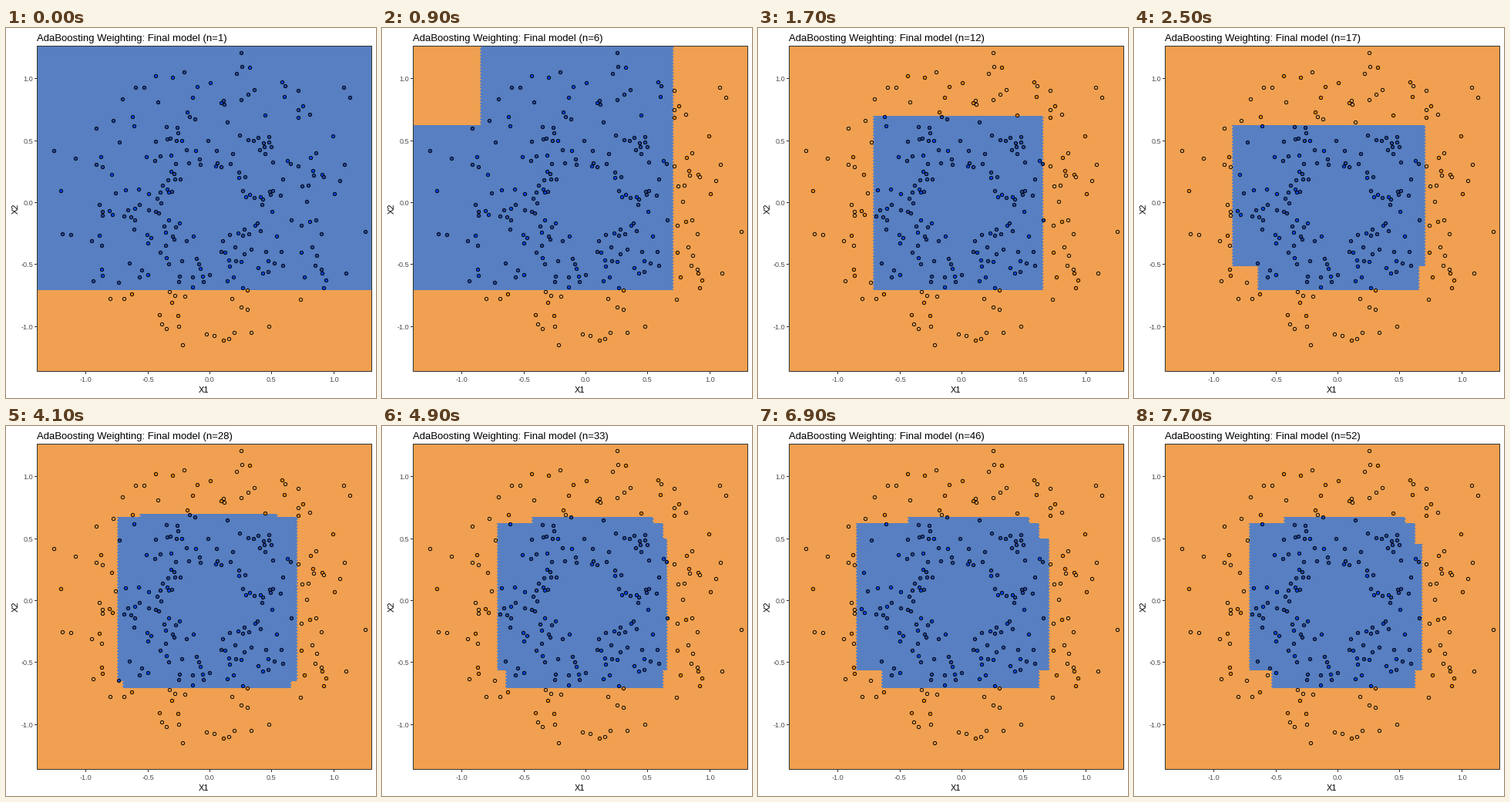
Recreate the animation shown at these times as a matplotlib script. Size 480 by 480 pixels, loop 8 s.

```python
import numpy as np
import matplotlib.pyplot as plt
from matplotlib.animation import FuncAnimation
from matplotlib.patches import Rectangle

SIZE, DPI = 480, 80
PT = 72 / DPI
LEFT, TOP, RIGHT, BOTTOM = 40, 23, 475, 446
X_ZERO, Y_ZERO, UNIT = 264, 227, 160.8
FLOOR, ROW_HEIGHT, FAR = 340, 4.14, 600
BLUE, ORANGE, BRIGHT_BLUE, BRIGHT_ORANGE, DARK_BLUE = np.array([
    (87, 127, 193), (240, 160, 80), (0, 72, 255), (255, 133, 0),
    (35, 72, 170)]) / 255


def ensemble(left=151, right=371, notch=162, waist=366, ledge=126,
             crown=196, top=118, shoulder=146, foot=317):
    """Boxes (x0, y0, x1, y1) whose union is predicted as blue."""
    return [(left, ledge, waist, foot), (crown, top, 353, FLOOR),
            (left, shoulder, right, foot), (notch, ledge, waist, FLOOR)]


half_plane = [(-FAR, -FAR, FAR, FLOOR)]
right_cut = [(-FAR, -FAR, 379, FLOOR)]
corner_cut = [(129, -FAR, 379, FLOOR), (-FAR, 126, 379, FLOOR)]
band = [(-FAR, 114, FAR, FLOOR)]
square = [(151, 114, 371, FLOOR)]
wide = dict(left=129, right=379)
high = dict(right=379, waist=371, ledge=118, shoulder=118, top=114, foot=331)

STEPS = [
    half_plane, right_cut, corner_cut, band, square,
    ensemble(top=126, shoulder=126, foot=309),
    ensemble(**wide, waist=371, top=126, shoulder=126, foot=309),
    ensemble(**wide), square, ensemble(**high),
    ensemble(**high, left=146, notch=153, crown=175),
    ensemble(right=379), ensemble(), ensemble(**wide), ensemble(),
    ensemble(notch=180), ensemble(), ensemble(**wide),
    ensemble(right=379, notch=171, shoulder=153),
    ensemble(right=375, notch=180, shoulder=153),
]


def scatter_ring(count):
    """A ring of points around an empty middle, thinner toward its rim."""
    rng = np.random.default_rng(11)
    outer = [(305, 32), (438, 77), (446, 90), (62, 159), (71, 211),
             (73, 267), (466, 264), (441, 318), (229, 411), (282, 405)]
    points = list(outer)
    while len(points) < count:
        radius, angle = rng.uniform(45, 186), rng.uniform(0, 2 * np.pi)
        x, y = X_ZERO + radius * np.cos(angle), Y_ZERO - radius * np.sin(angle)
        if min(np.hypot(x - a, y - b) for a, b in points) > 4:
            points.append((round(x), round(y)))
    return np.array(points), rng.random((count, 1)) < 0.28


points, is_accent = scatter_ring(258)
xs, ys = np.meshgrid(np.arange(LEFT, RIGHT), np.arange(TOP, BOTTOM))
bulge = 2 * np.abs(np.sin(np.pi * (ys + 0.5 - FLOOR) / ROW_HEIGHT))


def region_image(boxes):
    cover = np.zeros(xs.shape)
    for x0, y0, x1, y1 in boxes:
        side = np.minimum(xs + 1 - x0 + bulge, x1 - xs - bulge)
        cover = np.maximum(cover, np.clip(side, 0, 1) * (ys >= y0) * (ys < y1))
    return ORANGE + cover[..., None] * (BLUE - ORANGE)


def point_colors(boxes):
    x, y = points.T[..., None]
    blue = np.any([(x >= x0) & (x < x1) & (y >= y0) & (y < y1)
                   for x0, y0, x1, y1 in boxes], axis=0)
    return np.where(blue, np.where(is_accent, BRIGHT_BLUE, DARK_BLUE),
                    np.where(is_accent, BRIGHT_ORANGE, ORANGE))


plt.rcParams["font.family"] = "Liberation Sans"
fig = plt.figure(figsize=(SIZE / DPI, SIZE / DPI), dpi=DPI, facecolor="white")
ax = fig.add_axes([0, 0, 1, 1])
ax.axis("off")


def label(x, y, text, px, color="black", **kw):
    return ax.text(x, y, text, fontsize=px * PT, color=color, **kw)


def tick(xs, ys):
    ax.plot(xs, ys, color="#333333", lw=PT, snap=False,
            solid_capstyle="butt")


image = ax.imshow(region_image(STEPS[0]), extent=(LEFT, RIGHT, BOTTOM, TOP),
                  interpolation="nearest", aspect="auto")
dots = ax.scatter(*(points.T + 0.5), s=(4.3 * PT) ** 2, linewidths=0.95 * PT,
                  edgecolors="black", zorder=2)
ax.add_patch(Rectangle((LEFT + 0.5, TOP + 0.5), RIGHT - LEFT - 1,
                       BOTTOM - TOP - 1, fill=False, ec="#333333",
                       lw=PT, zorder=3, snap=False))

for value in np.arange(-1, 1.1, 0.5):
    x = round(X_ZERO + UNIT * value) + 0.5
    y = round(Y_ZERO - UNIT * value) - 0.5
    tick([x, x], [BOTTOM, BOTTOM + 3])
    tick([LEFT - 3, LEFT], [y, y])
    label(x, 459, f"{value:.1f}", 9.2, "#4d4d4d", ha="center")
    label(35, y, f"{value:.1f}", 9.2, "#4d4d4d",
          ha="right", va="center_baseline")

label(257, 473, "X1", 11, ha="center")
label(13, 234, "X2", 11, ha="center", va="center", rotation=90)
title = label(40, 17, "", 13.1)
ax.set_xlim(0, SIZE)
ax.set_ylim(SIZE, 0)


def update(frame):
    step = 0 if frame < 5 else 1 + (frame - 5) // 4
    image.set_data(region_image(STEPS[step]))
    dots.set_facecolors(point_colors(STEPS[step]))
    title.set_text(
        f"AdaBoosting Weighting: Final model (n={round(1 + 8 * step / 3)})")
    return image, dots, title


anim = FuncAnimation(fig, update, frames=80, interval=100,
                     repeat=True, repeat_delay=0)
plt.show()
```
